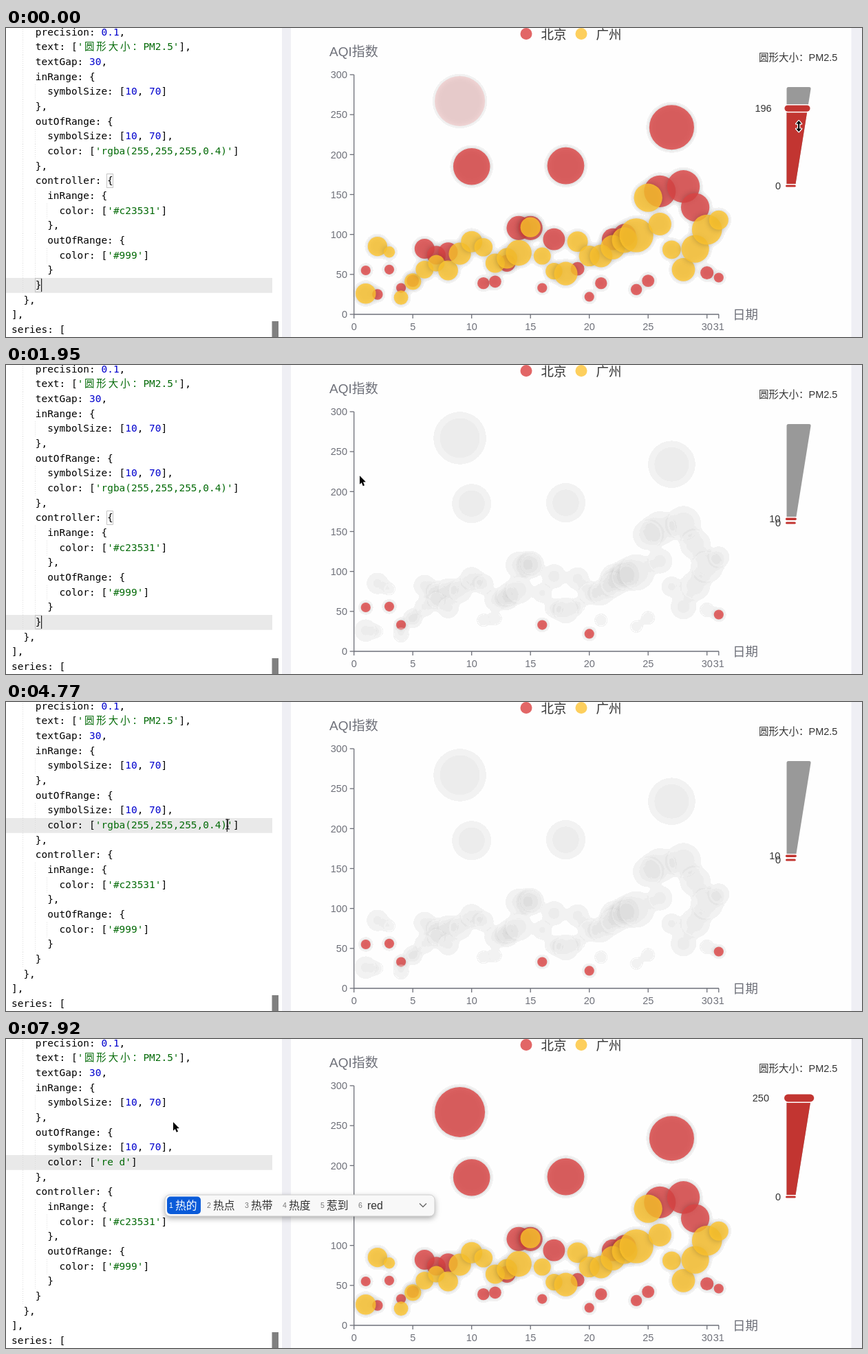
An HTML page with a canvas for the animation above (8 s loop, 1244 px wide and 450 px high).

```html
<!DOCTYPE html>
<html lang="zh">
<head>
<meta charset="utf-8">
<title>AQI</title>
<style>
html, body { margin: 0; width: 100%; height: 100%; overflow: hidden; background: #fff; }
canvas { display: block; }
</style>
</head>
<body>
<canvas id="stage" width="1244" height="450"></canvas>
<script>
const LOOP = 8000, DRAG = 1050, FADE = 300, CLICK = 4040, SELECT = 5970, TYPE = 7020, RESET = 7470;
const MONO = '14.45px "DejaVu Sans Mono", "Noto Sans CJK SC", monospace';
const SANS = '"Liberation Sans", "Noto Sans CJK SC", sans-serif';
const GREY = '#6e7079', RED = '#c23531';
const c = document.getElementById('stage').getContext('2d');

const code = `    precision: 0.1,
    text: ['圆形大小：PM2.5'],
    textGap: 30,
    inRange: {
      symbolSize: [10, 70]
    },
    outOfRange: {
      symbolSize: [10, 70],
      color: ['@']
    },
    controller: {
      inRange: {
        color: ['#c23531']
      },
      outOfRange: {
        color: ['#999']
      }
    }
  },
],
series: [`.split('\n');

// Daily AQI; the bubble size (PM2.5) follows from it
const beijing = [55, 25, 56, 33, 42, 82, 74, 78, 267, 185, 39, 41, 64, 108, 108, 33, 94, 186, 57,
  22, 39, 94, 99, 31, 42, 154, 234, 160, 134, 52, 46];
const guangzhou = [26, 85, 78, 21, 41, 56, 64, 55, 76, 91, 84, 64, 70, 77, 109, 73, 54, 51, 91,
  73, 73, 84, 93, 99, 146, 113, 81, 56, 82, 106, 118];
const clearDays = [1, 3, 4, 16, 20, 31];
const beijingPm = (day, aqi) => clearDays.includes(day) ? 7 : aqi < 60 ? aqi * 0.47 : aqi * 0.82 - 9;
const guangzhouPm = (day, aqi, next = aqi / 2) => next * (0.7 + 0.0075 * day);

const plot = (data, rgb, pmOf) => data.map((aqi, i) => ({ day: i + 1, aqi, rgb, pm: pmOf(i + 1, aqi, data[i + 1]) }));
const points = [...plot(beijing, [221, 68, 68], beijingPm), ...plot(guangzhou, [254, 196, 44], guangzhouPm)];

const colX = n => 8 + n * 8.7;
const rowY = n => 169 + (n - 8) * 21.67;
const dayX = d => 505.7 + 17.1 * d;
const aqiY = v => 417 - v * 349 / 300;
const barY = v => 230 - v * 0.576;
const barRight = v => 1147 + 0.092 * v;
const clamp = p => Math.min(1, Math.max(0, p));
const ease = p => 1 - Math.pow(1 - clamp(p), 3);

// The upper handle is dragged from 196 to 10, gaining speed
const dragged = t => 196 - 186 * Math.pow(clamp(t / DRAG), 2.03);
const passTime = pm => pm > 196 ? -85 : DRAG * Math.pow((196 - pm) / 186, 1 / 2.03);

function faded(pm, t) {
  if (pm <= 10) return 0;
  return t >= RESET ? 1 - ease((t - RESET) / FADE) : ease((t - passTime(pm)) / FADE);
}

function rect(x, y, w, h, fill, r = 0) {
  c.fillStyle = fill;
  c.beginPath();
  c.roundRect(x, y, w, h, r);
  c.fill();
}

function disc(g, x, y, r, fill) {
  g.fillStyle = fill;
  g.beginPath();
  g.arc(x, y, r, 0, 7);
  g.fill();
}

function label(s, x, y, size, fill, align = 'left') {
  c.font = size + 'px ' + SANS;
  c.fillStyle = fill;
  c.textAlign = align;
  c.fillText(s, x, y + size * 0.36);
}

function line(color, width, ...pts) {
  c.strokeStyle = color;
  c.lineWidth = width;
  c.beginPath();
  pts.forEach(([x, y]) => c.lineTo(x, y));
  c.stroke();
}

// Bubble layer, its shadows flattened into bands of grey
const LX = 460, LY = 56, LW = 620, LH = 360;
const layer = Object.assign(document.createElement('canvas'), { width: LW, height: LH });
const lc = layer.getContext('2d', { willReadFrequently: true });

function flatten() {
  const img = lc.getImageData(0, 0, LW, LH), d = img.data;
  for (let i = 0; i < d.length; i += 4) {
    const v = d[i + 1];
    if (Math.abs(d[i] - v) > 3 || Math.abs(d[i + 2] - v) > 3) continue;
    const band = v >= 247 ? 254 : v >= 239 ? 242 : 236 + Math.round((v - 236) / 7) * 7;
    d[i] = d[i + 1] = d[i + 2] = band;
  }
  lc.putImageData(img, 0, 0);
}

function bubbles(t) {
  lc.fillStyle = '#fefefe';
  lc.fillRect(0, 0, LW, LH);
  lc.save();
  lc.translate(-LX, -LY);
  lc.globalAlpha = 0.8;
  lc.shadowColor = 'rgba(0,0,0,0.3)';
  lc.shadowBlur = 9;
  for (const { day, aqi, pm, rgb } of points) {
    const f = faded(pm, t);
    const mix = rgb.map(v => Math.round(v + (255 - v) * f));
    disc(lc, dayX(day), aqiY(aqi), 6.05 + pm * 0.145, `rgba(${mix},${1 - 0.6 * f})`);
  }
  lc.restore();
  flatten();
  c.drawImage(layer, LX, LY);
}

function legend(name, x, color) {
  disc(c, x, 8.5, 8.5, color);
  label(name, x + 21.5, 9, 18.5, '#333');
}

function chart(t) {
  rect(401, 0, 843, 450, '#efeff4');
  rect(414, 0, 814.5, 450, '#fefefe');
  bubbles(t);
  line(GREY, 1.3, [505.7, 68], [505.7, 417], [1036, 417]);
  for (let v = 0; v <= 300; v += 50) {
    line(GREY, 1.3, [499.7, aqiY(v)], [505.7, aqiY(v)]);
    label(v, 496, aqiY(v), 14.5, GREY, 'right');
  }
  for (let d = 0; d <= 31; d += d < 30 ? 5 : 1) {
    line(GREY, 1.3, [dayX(d), 417], [dayX(d), 423]);
    label(d, dayX(d), 434.5, 14.5, GREY, 'center');
  }
  label('AQI指数', 470, 34.5, 19, GREY);
  label('日期', 1056, 417, 18.5, GREY);
  legend('北京', 756, '#e26666');
  legend('广州', 836, '#fdcf5d');
}

function handle(v) {
  const k = v / 250, h = 3.2 + 7.6 * k, x = 1133 - 2 * k;
  const w = barRight(v) + 0.8 + 3.5 * k - x, y = barY(v) - h / 2;
  rect(x - 1.5, y - 1.5, w + 3, h + 3, '#fff', h / 2 + 1);
  rect(x, y, w, h, RED, h / 2);
  label(Math.round(v), 1126 - 17 * k, barY(v), 14.5, '#333', 'right');
}

function slider(t) {
  const v = t >= RESET ? 250 : dragged(t);
  label('圆形大小：PM2.5', 1094, 42.5, 14.5, '#333');
  c.save();
  c.beginPath();
  c.moveTo(1134.5, 230);
  c.arcTo(1134.5, 86, 1170, 86, 2.5);
  c.arcTo(1170, 86, 1147, 230, 2.5);
  c.lineTo(1147, 230);
  c.clip();
  rect(1130, 80, 50, 155, '#999');
  rect(1130, barY(v), 50, 160, RED);
  c.restore();
  handle(0);
  handle(v);
}

function codeLine(text, row) {
  const y = rowY(row) + 15;
  let col = 0;
  for (const part of text.match(/'[^']*'|[\d.]+|[^'\d]+/g)) {
    c.fillStyle = part[0] === "'" ? '#036a07' : /^\d/.test(part) ? '#0000cd' : '#000';
    for (const run of part.match(/[\u3000-\uffff]|[^\u3000-\uffff]+/g)) {
      const wide = run.charCodeAt(0) > 0x2fff;
      c.fillText(run, colX(col) + (wide ? 1.5 : 0), y);
      col += wide ? 2 : run.length;
    }
  }
}

function guides(row, indent) {
  c.setLineDash([1, 2]);
  for (let k = 2; k < indent; k += 2) {
    const x = Math.round(colX(k)) - 0.5;
    line('#dcdcdc', 1, [x, rowY(row)], [x, rowY(row + 1)]);
  }
  c.setLineDash([]);
}

function bracketBox(col, row) {
  c.strokeStyle = '#c4c4c4';
  c.lineWidth = 1;
  c.strokeRect(Math.round(colX(col)) - 0.5, Math.round(rowY(row)) + 0.5, 9, 20);
}

const caret = (col, row) => rect(colX(col) - 0.5, rowY(row) + 1, 1.2, 19, '#222');

function editor(t) {
  rect(0, 0, 401, 450, '#fff');
  const active = t < CLICK ? 17 : t < 4770 ? 7 : 8;
  rect(0, rowY(active), 387, 21.67, '#e9e9e9');
  if (t >= SELECT && t < TYPE) rect(colX(15), rowY(8), colX(36) - colX(15), 21.67, '#b5d5ff');
  const value = t < TYPE ? 'rgba(255,255,255,0.4)' : t < RESET ? 'r' : t < 7620 ? 're' : 're d';
  c.font = MONO;
  c.textAlign = 'left';
  code.forEach((text, row) => {
    guides(row, text.search(/\S/));
    codeLine(text.replace('@', value), row);
  });
  if (t < CLICK) {
    bracketBox(16, 10);
    bracketBox(4, 17);
    caret(5, 17);
  } else if (t < SELECT) {
    caret(active === 7 ? 27 : 36, active);
  }
  rect(386.5, 427, 9.5, 23, '#808080');
}

function candidates(t) {
  if (t < TYPE) return;
  const words = (t < RESET ? '人 日 热 让 入 r' : '热的 热点 热带 热度 惹到 red').split(' ');
  const step = 23 + 16 * words[0].length, width = 62 + 6 * step, end = 231 + width - 17;
  c.save();
  c.shadowColor = 'rgba(0,0,0,0.35)';
  c.shadowBlur = 9;
  c.shadowOffsetY = 3;
  rect(231, 227, width, 31, '#f8f8f8', 7);
  c.restore();
  c.strokeStyle = '#cfcfcf';
  c.lineWidth = 1;
  c.stroke();
  rect(234, 229.5, step - 6, 25.5, '#0a5bd9', 5);
  words.forEach((w, i) => {
    const x = 237 + i * step;
    label(i + 1, x, 242.5, 10.5, i ? '#777' : '#fff');
    label(w, x + (i === 5 ? 13 : 9), 242, 15.8, i ? '#333' : '#fff');
  });
  line('#666', 1.3, [end - 5, 239.5], [end, 244.5], [end + 5, 239.5]);
}

function shape(x, y, pts) {
  c.beginPath();
  pts.forEach(([dx, dy]) => c.lineTo(x + dx, y + dy));
  c.closePath();
  c.strokeStyle = '#fff';
  c.lineWidth = 2.4;
  c.lineJoin = 'round';
  c.stroke();
  c.fillStyle = '#000';
  c.fill();
}

function resizer(x, y) {
  const tip = [[-1, -3.5], [-4, -3.5], [0, -8], [4, -3.5], [1, -3.5]];
  shape(x, y, [...tip, ...tip.map(([a, b]) => [-a, -b])]);
}

const arrow = (x, y) =>
  shape(x, y, [[0, 0], [0, 12.5], [2.8, 10], [4.8, 14.8], [7, 13.8], [5, 9.2], [8.8, 9]]);

function beam(x, y) {
  for (const s of [-1, 1]) {
    line('#222', 1.2, [x + 3 * s, y - 7], [x + s, y - 7], [x, y - 6], [x, y + 6], [x + s, y + 7], [x + 3 * s, y + 7]);
  }
  line('#222', 1.2, [x - 1.5, y + 3], [x + 1.5, y + 3]);
}

// Resting places of the mouse after the drag: time, x, y
const stops = [[1050, 1143, 250], [1350, 1000, 158], [2250, 271, 163], [2840, 170, 242],
  [3440, 174, 226], [4040, 318, 160], [4770, 322, 178], [5670, 142, 180], [6570, 137, 183]];

function pointer(t) {
  if (t < 1200) {
    const v = dragged(t);
    return resizer(1134.5 + 0.09 * v, barY(v) + 26);
  }
  if (t >= 7620) return arrow(243, 121);
  if (t >= TYPE) return;
  const i = Math.max(1, stops.findIndex(s => s[0] > t));
  const a = t < 6570 ? stops[i - 1] : stops.at(-1), b = t < 6570 ? stops[i] : a;
  const p = a === b ? 0 : (t - a[0]) / (b[0] - a[0]);
  const x = a[1] + (b[1] - a[1]) * p, y = a[2] + (b[2] - a[2]) * p;
  (x > 400 ? arrow : beam)(x, y);
}

// The picture advances in steps of 150 ms
function stepped(t) {
  const base = t < 2840 ? 0 : t < 4470 ? 2840 : 4470;
  return base + Math.floor((t - base) / 150) * 150;
}

const start = performance.now();
let shown = -1;

function frame() {
  const t = stepped((performance.now() - start) % LOOP);
  if (t !== shown) {
    shown = t;
    [chart, slider, editor, candidates, pointer].forEach(draw => draw(t));
  }
  requestAnimationFrame(frame);
}
frame();
</script>
</body>
</html>
```
